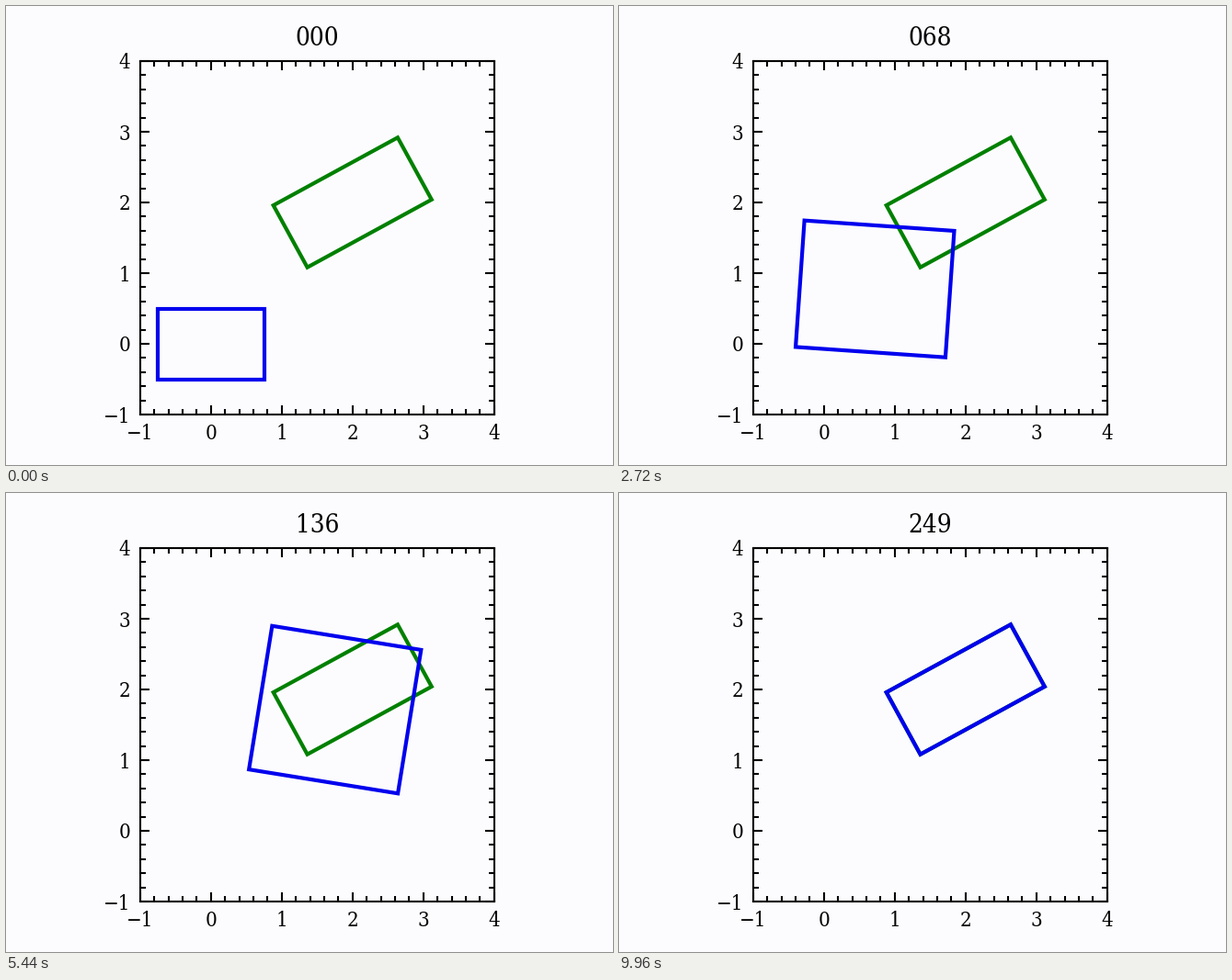
A matplotlib script for the animation above (10 s loop, 660x500 px).

```python
import numpy as np
import matplotlib.pyplot as plt
from matplotlib.animation import FuncAnimation
from matplotlib.patches import Polygon
from matplotlib.ticker import MultipleLocator

FRAMES = 250
INTERVAL = 40
PAPER = "#fcfcfe"

# A box is x, y, width, height, angle
START = np.array([0, 0, 1.5, 1, 0])
GOAL = np.array([2, 2, 2, 1, 0.5])
RATE = 0.01  # growth per step before the boxes touch
TOUCH = 43

# The fit drifts steadily, swells over the goal, then turns and settles on it
PATH = {
    0: START,
    TOUCH: START + RATE * TOUCH * np.array([1, 1, 1, 1, -0.03]),
    92: (1.04, 1.13, 2.225, 2.075, -0.126),
    136: (1.753, 1.714, 2.13, 2.057, -0.16),
    167: (2.032, 2.029, 1.723, 1.353, 0.182),
    202: GOAL,
}
STEPS = np.array(list(PATH))
STATES = np.array(list(PATH.values()))
SLOPES = np.gradient(STATES, STEPS, axis=0)
SLOPES[-1] = 0


def box_state(step):
    """Smooth cubic path through the key states."""
    step = min(step, STEPS[-1])
    k = min(np.searchsorted(STEPS, step, side="right") - 1, len(STEPS) - 2)
    span = STEPS[k + 1] - STEPS[k]
    s = (step - STEPS[k]) / span
    ease = s * s * (3 - 2 * s)
    bend = SLOPES[k] * (1 - s) - SLOPES[k + 1] * s
    return STATES[k] * (1 - ease) + STATES[k + 1] * ease + span * s * (1 - s) * bend


def corners(x, y, w, h, angle):
    c, s = np.cos(angle), np.sin(angle)
    unit = np.array([(-1, -1), (1, -1), (1, 1), (-1, 1)]) / 2
    return unit * (w, h) @ np.array([(c, s), (-s, c)]) + (x, y)


def add_box(state, color):
    return ax.add_patch(Polygon(corners(*state), fill=False, edgecolor=color,
                                linewidth=3, joinstyle="miter"))


plt.rcParams.update({"font.family": "DejaVu Serif", "font.stretch": "condensed",
                     "font.size": 16, "axes.linewidth": 1.5})

fig, ax = plt.subplots(figsize=(6.6, 5), dpi=100, facecolor=PAPER)
ax.set_facecolor(PAPER)
ax.set_aspect("equal")
ax.set_xlim(-1, 4)
ax.set_ylim(-1, 4)
for axis in (ax.xaxis, ax.yaxis):
    axis.set_major_locator(MultipleLocator(1))
    axis.set_minor_locator(MultipleLocator(0.2))
ax.tick_params(which="both", direction="in", top=True, right=True, width=1.5)
ax.tick_params(which="major", length=7, pad=7.5)
ax.tick_params(which="minor", length=4)
title = ax.set_title("000", fontsize=20, y=1.0, pad=12)

add_box(GOAL, "#008000")
box = add_box(START, "#0000ee")


def update(step):
    box.set_xy(corners(*box_state(step)))
    title.set_text(f"{step:03d}")
    return box, title


anim = FuncAnimation(fig, update, frames=FRAMES, interval=INTERVAL,
                     repeat=True, repeat_delay=0)
plt.show()
```
